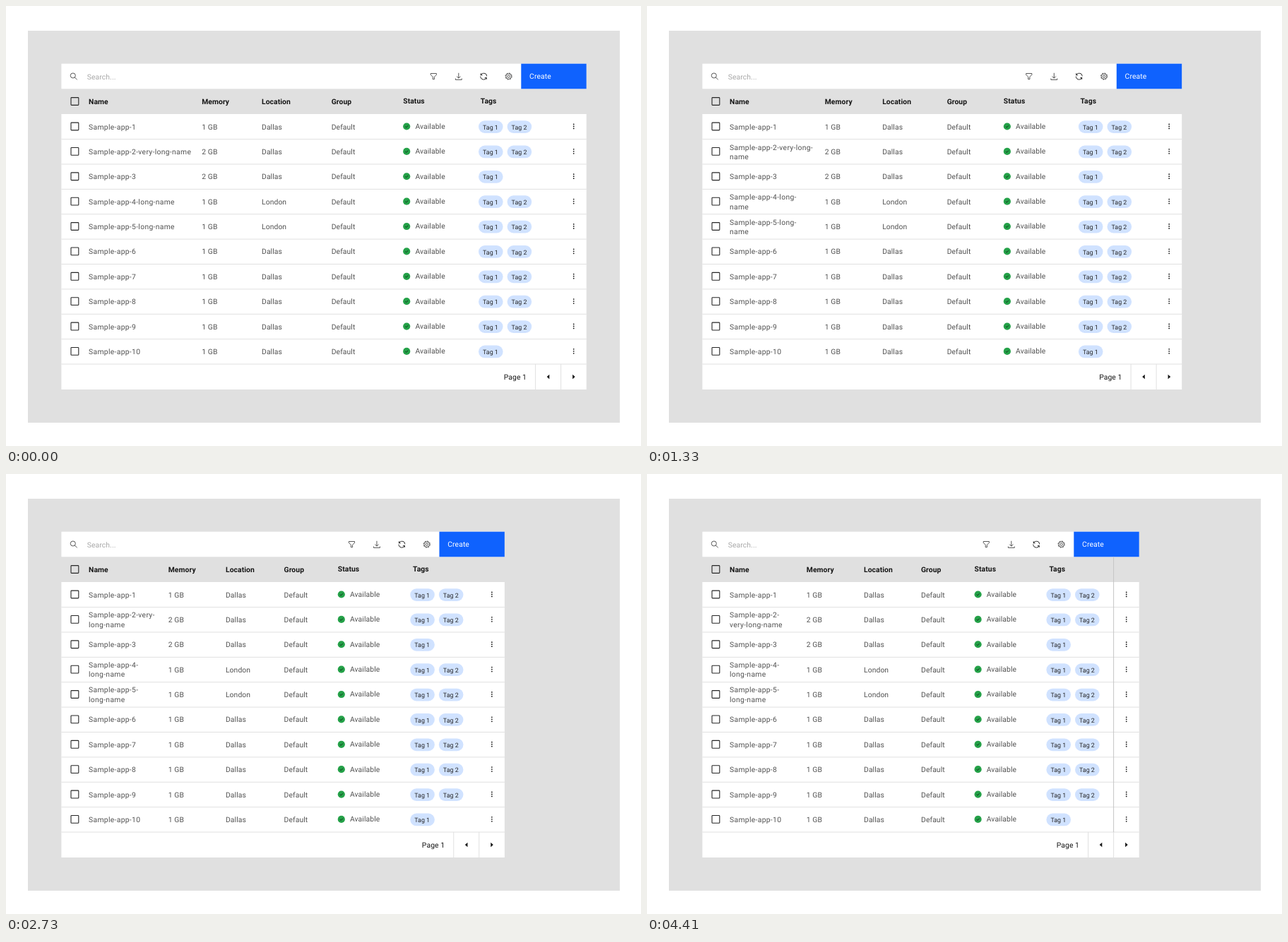
Recreate the animation shown at these times as an HTML page. Size 899x623 px, loop 4.55 s.

```html
<!DOCTYPE html>
<html lang="en">
<head>
<meta charset="utf-8">
<title>Resizing data table</title>
<style>
html, body { margin: 0; width: 100%; height: 100%; overflow: hidden; background: #fff; }
#stage {
  --a: 0; --b: 0;
  --edge: calc((821.7 - 66.4 * var(--a) - 58.6 * var(--b)) * 1px);
  display: block; width: 899px; height: 623px;
  font: 10.33px Roboto, Inter, sans-serif; letter-spacing: .1px;
  text-rendering: geometricPrecision; fill: #525252;
}
.col { transform: translateX(calc((var(--s) + (var(--m) - var(--s)) * var(--a) + (var(--e) - var(--m)) * var(--b)) * 1px)); }
.right { transform: translateX(var(--edge)); }
.wide { x: 78.4px; width: calc(var(--edge) - 78.4px); fill: #fff; }
.line, .rule { fill: #e0e0e0; }
.name { letter-spacing: .32px; }
.rise { transform: translateY(calc(-6.6px * var(--a))); }
.head { font-weight: 700; fill: #161616; letter-spacing: .08px; }
.box { fill: none; stroke: #262626; stroke-width: 1.1px; }
.pill { fill: #d0e2ff; }
.tag { font-size: 8.85px; letter-spacing: .02px; fill: #262626; }
.icon { fill: none; stroke: #262626; stroke-width: 2.1px; }
.solid { fill: #161616; stroke: none; }
</style>
</head>
<body>
<svg id="stage" viewBox="0 0 899 623">
  <rect x="31" y="35" width="838" height="555" fill="#e0e0e0"/>
  <rect class="wide" y="81.7" height="35.6"/>
  <rect class="wide" y="153" height="390"/>
  <g id="rows"></g>
  <g class="icon" transform="translate(90 93.7) scale(.369)"><circle cx="13" cy="13" r="9.5"/><path d="M20 20L29 29"/></g>
  <text x="114.8" y="103.7" fill="#a8a8a8">Search...</text>
  <g class="right" id="right">
    <g class="icon" transform="translate(-222.3 93.7) scale(.369)"><path d="M5 5H27V10L19 18V27H13V18L5 10Z"/></g>
    <g class="icon" transform="translate(-186.8 93.7) scale(.369)"><path d="M16 3V23M9 16L16 23L23 16M4 24V29H28V24"/></g>
    <g class="icon solid" transform="translate(-151.4 93.7) scale(.369)"><path d="M12 10H6.8A11 11 0 0 1 27 16H29.1A13 13 0 0 0 6 7.6V4H4V12H12ZM20 22H25.2A11 11 0 0 1 5 16H2.9A13 13 0 0 0 26 24.4V28H28V20H20Z"/></g>
    <g class="icon" transform="translate(-116 93.7) scale(.369)"><circle cx="16" cy="16" r="10.5"/><circle cx="16" cy="16" r="12.6" stroke-dasharray="5 4.896"/><circle cx="16" cy="16" r="4.6"/></g>
    <rect x="-92.4" y="81.7" width="92.4" height="35.6" fill="#0f62fe"/>
    <text x="-80.6" y="103.4" fill="#fff">Create</text>
    <rect class="rule" x="-72.6" y="507" width="1" height="36"/>
    <rect class="rule" x="-36.6" y="507" width="1" height="36"/>
    <text x="-117" y="529" fill="#161616">Page 1</text>
    <path class="solid" d="M-52.4 521.7V528.3L-56 525ZM-19.6 521.7V528.3L-16 525Z"/>
    <rect id="divider" x="-36.6" y="117.3" width="1" height="389.7" fill="#c6c6c6"/>
  </g>
</svg>
<script>
const LOOP = 4550, STEP = 70, ROW = 35.38, FIRST = 170.9;
const stage = document.getElementById('stage');
const right = document.getElementById('right');
const rows = document.getElementById('rows');
const divider = document.getElementById('divider');

// Column x at the wide, middle and narrow layouts
const columns = {
  memory: [277.2, 251, 225.8],
  location: [362, 332.3, 307],
  group: [460.7, 423.6, 388],
  status: [562.2, 503.2, 463.6],
  tags: [671.8, 611.8, 569.5],
  pills: [669, 609.2, 565.4]
};

function add(parent, tag, attrs, text = '') {
  const el = document.createElementNS('http://www.w3.org/2000/svg', tag);
  for (const [key, value] of Object.entries(attrs)) el.setAttribute(key, value);
  el.textContent = text;
  parent.append(el);
  return el;
}

// Text whose capitals are centred on y
const label = (parent, x, y, text, cls = '') =>
  add(parent, 'text', { x, y: y + 3.65, class: cls }, text);

const checkbox = y =>
  add(stage, 'rect', { class: 'box', x: 92, y: y - 5.4, width: 10.8, height: 10.8, rx: .8 });

const cols = {};
for (const [key, [s, m, e]] of Object.entries(columns))
  cols[key] = add(stage, 'g', { class: 'col', style: `--s:${s};--m:${m};--e:${e}` });

checkbox(135);
label(stage, 117, 135.4, 'Name', 'head');
for (const key of ['memory', 'location', 'group', 'status', 'tags'])
  label(cols[key], 0, key === 'status' || key === 'tags' ? 134.8 : 135.4,
    key[0].toUpperCase() + key.slice(1), 'head');

const suffix = { 2: '-very-long-name', 4: '-long-name', 5: '-long-name' };
// [start time, characters kept on the first line]
const breaks = {
  2: [[70, 23], [1820, 18], [2800, 13]],
  4: [[70, 18], [2660, 13]],
  5: [[70, 18], [2660, 13]]
};
const wrapped = [];

for (let n = 1; n <= 10; n++) {
  const y = FIRST + ROW * (n - 1);
  const name = 'Sample-app-' + n + (suffix[n] || '');
  checkbox(y - .4);
  if (suffix[n]) wrapped.push({
    name,
    steps: breaks[n],
    lines: [label(stage, 117, y, name, 'name rise'), label(stage, 117, y + 13.4, '', 'name rise')]
  });
  else label(stage, 117, y, name, 'name');
  label(cols.memory, 0, y, (n === 2 || n === 3 ? 2 : 1) + ' GB');
  label(cols.location, 0, y, n === 4 || n === 5 ? 'London' : 'Dallas');
  label(cols.group, 0, y, 'Default');
  label(cols.status, 17.2, y - .6, 'Available');
  add(cols.status, 'circle', { cx: 5, cy: y - .4, r: 5.1, fill: '#24a148' });
  add(cols.status, 'path', { d: `M2.9 ${y - .3}l1.5 1.4l2.7 -2.8`, fill: 'none', stroke: '#12351c' });
  for (let k = 1; k <= (n === 3 || n === 10 ? 1 : 2); k++) {
    const x = (k - 1) * 40.6;
    add(cols.pills, 'rect', { class: 'pill', x, y: y - 8.7, width: 34.6, height: 17.7, rx: 8.85 });
    add(cols.pills, 'text', { class: 'tag', x: x + 6, y: y + 3.8 }, 'Tag ' + k);
  }
  for (const dy of [-3, 0, 3])
    add(right, 'circle', { class: 'solid', cx: -18, cy: y - .5 + dy, r: .9 });
  add(rows, 'rect', { class: 'wide line', style: 'fill:#e0e0e0', y: y + 17.2, height: 1 });
}

const clamp = v => Math.min(1, Math.max(0, v));
const bezier = (p, q, s) => 3 * s * (1 - s) * ((1 - s) * p + s * q) + s * s * s;

// cubic-bezier(.15, .1, .25, 1)
function ease(x) {
  let lo = 0, hi = 1;
  for (let i = 0; i < 24; i++) {
    const mid = (lo + hi) / 2;
    if (bezier(.15, .25, mid) < x) lo = mid; else hi = mid;
  }
  return x >= 1 ? 1 : x <= 0 ? 0 : bezier(.1, 1, lo);
}

function draw(now) {
  const t = Math.floor(now % LOOP / STEP) * STEP;
  stage.style.setProperty('--a', ease(t / 1700).toFixed(5));
  stage.style.setProperty('--b', ease((t - 1750) / 1850).toFixed(5));
  divider.style.opacity = clamp((t - 3360) / 350);
  for (const { name, steps, lines } of wrapped) {
    const step = steps.filter(s => t >= s[0]).pop();
    const cut = step ? step[1] : name.length;
    lines[0].textContent = name.slice(0, cut);
    lines[1].textContent = name.slice(cut);
  }
  requestAnimationFrame(draw);
}
draw(performance.now());
</script>
</body>
</html>
```
